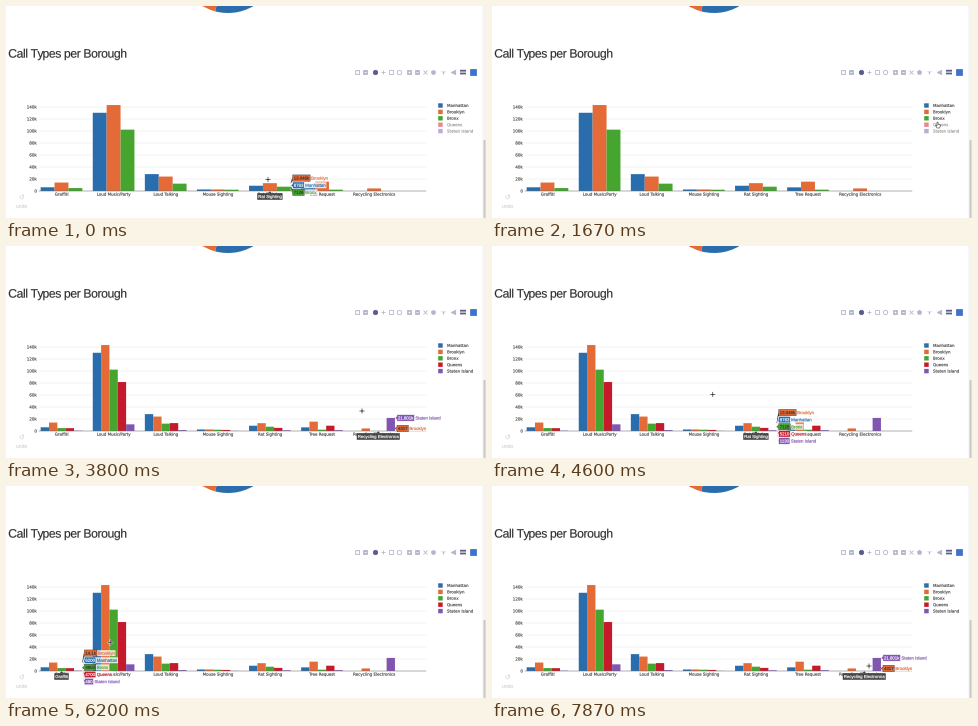
A matplotlib script that plays this animation: 480 by 212 pixels, repeating every 8 s.

```python
import matplotlib.pyplot as plt
import numpy as np
from matplotlib.animation import FuncAnimation
from matplotlib.patches import PathPatch, Polygon, Rectangle, Wedge
from matplotlib.path import Path
from matplotlib.textpath import TextPath

W, H, DPI = 480, 212, 100
FRAMES, STEP = 200, 40
PX = 72 / DPI

BLUE, ORANGE, GREEN, RED, PURPLE = COLORS = [
    "#2a6dac", "#e46a37", "#45a52e", "#c41a2b", "#8156b0"]
BOROUGHS = ["Manhattan", "Brooklyn", "Bronx", "Queens", "Staten Island"]
CALLS = {
    "Graffiti": [6200, 14100, 4900, 4700, 480],
    "Loud Music/Party": [130391, 143250, 102256, 81609, 11126],
    "Loud Talking": [28120, 24070, 12240, 13180, 1490],
    "Mouse Sighting": [2555, 2600, 2152, 1786, 200],
    "Rat Sighting": [8783, 13046, 7126, 5210, 1130],
    "Tree Request": [6080, 15560, 2210, 8840, 1370],
    "Recycling Electronics": [0, 4317, 0, 0, 21801],
}
NAMES = list(CALLS)
X0, PITCH, GROUP = 55.5, 52.1, 41.7
BASE, SCALE = 185, 0.0006
LEFT, RIGHT = 33, 420
SANS, WIDE = "Liberation Sans", "DejaVu Sans"
DARK = "#444444"

fig = plt.figure(figsize=(W / DPI, H / DPI), dpi=DPI, facecolor="white")
ax = fig.add_axes([0, 0, 1, 1])
ax.set(xlim=(0, W), ylim=(H, 0))
ax.axis("off")


def add(patch, z=1):
    patch.set(zorder=z, snap=False)
    return ax.add_patch(patch)


def rect(x, y, w, h, color, z=1, **kw):
    return add(Rectangle((x, y), w, h, fc=color, lw=0, **kw), z)


def poly(points, color, z=1, **kw):
    return add(Polygon(points, fc=color, **kw), z)


def line(xs, ys, color, width=1, z=1):
    return ax.plot(xs, ys, color=color, lw=width * PX, zorder=z, snap=False)[0]


def outline(s, size, font):
    path = TextPath((0, 0), s, size=100, prop={"family": font})
    return path.vertices * size / 100, path.codes


def width(s, size, font):
    return outline(s, size, font)[0][:, 0].max()


def text(x, y, s, size=4, color=DARK, font=WIDE, align=0, z=2, **kw):
    """Draw text with its capitals centred on y; align is 0, .5 or 1."""
    verts, codes = outline(s, size, font)
    shift = [x - align * verts[:, 0].max(), y + 0.36 * size]
    path = Path(verts * [1, -1] + shift, codes)
    return add(PathPatch(path, fc=color, ec=color, lw=0.1, **kw), z)


def center(cat):
    return X0 + PITCH * cat


def draw_page():
    for start, end, color in ((0, 105, BLUE), (105, 180, ORANGE)):
        add(Wedge((222, -43), 50, start, end, fc=color, lw=0))

    title, size, tracking = "Call Types per Borough", 12.2, -0.4
    for i, ch in enumerate(title):
        if ch != " ":
            x = width(title[:i] + "n", size, SANS) - width("n", size, SANS)
            text(2.2 + x + tracking * i, 47.2, ch, size, "#2c2c2c", SANS)

    rect(476.5, 0, 3.5, H, "#f4f4f4")
    rect(477.5, 134, 2, H - 134, "#c8c8c8")
    text(15.5, 191, "↺", 7, "#d8d8d8", WIDE, 0.5)
    text(15.5, 200, "undo", 5, "#d4d4d4", SANS, 0.5)


def draw_modebar():
    """Icons as marker stacks; a lower-case 'w' suffix means a white overlay."""
    pale, active, logo = "#b4b5ca", "#5a5d86", "#3f72cf"
    groups = [["s ow", "s _w"], ["o", "+", "s hollow", "o hollow"],
              ["s +w", "s _w", "x", "p"], ["1"], ["<"], ["="], ["s"]]
    x, y = 351, 66
    for g, group in enumerate(groups):
        for icon in group:
            base, *extra = icon.split()
            color = active if icon in ("o", "=") else pale
            color = logo if g == len(groups) - 1 else color
            size = 6 if color == logo else 4.4
            if base == "=":
                for dy in (-2.2, 0.6):
                    rect(x - 3, y + dy, 6, 1.8, color)
            else:
                face = "none" if extra == ["hollow"] else color
                ax.plot(x, y, base, ms=size * PX, mfc=face, mec=color,
                        mew=0.8 * PX)
            if extra and extra[0].endswith("w") and extra != ["hollow"]:
                ax.plot(x, y, extra[0][0], ms=2.6 * PX, mfc="white",
                        mec="white", mew=0.8 * PX)
            x += 8
        x += 2


def draw_axes():
    for i in range(8):
        y = BASE - 12 * i
        if i:
            line([LEFT, RIGHT], [y, y], "#f1f1f1", 0.8, 0.5)
        text(30.7, y, f"{20 * i}k" if i else "0", align=1)
    line([LEFT, RIGHT], [BASE, BASE], "#666666", 0.5, 3)
    for i, name in enumerate(NAMES):
        text(center(i), 188.2, name, align=0.5)


def bar_left(cat, k, n):
    return center(cat) + GROUP * (k / n - 0.5)


def draw_traces(n):
    """Bars and legend with the first n boroughs switched on."""
    parts = []
    for cat, values in enumerate(CALLS.values()):
        for k, v in enumerate(values[:n]):
            parts.append(rect(bar_left(cat, k, n), BASE - v * SCALE,
                              GROUP / n, v * SCALE, COLORS[k]))
    for k, name in enumerate(BOROUGHS):
        y, alpha = 99.5 + 6.4 * k, 1 if k < n else 0.5
        parts.append(rect(432.2, y - 2.2, 4.5, 4.4, COLORS[k], alpha=alpha))
        parts.append(text(441, y, name, alpha=alpha))
    return parts


def spread(ys, gap=7.1):
    """Push sorted positions apart to at least gap, keeping group means."""
    blocks = []
    for y in ys:
        blocks.append([y])
        while len(blocks) > 1:
            a, b = blocks[-2:]
            if np.mean(b) - np.mean(a) >= gap * (len(a) + len(b)) / 2:
                break
            blocks[-2:] = [a + b]
    return [np.mean(b) + gap * (i - (len(b) - 1) / 2)
            for b in blocks for i in range(len(b))]


def short(v):
    return f"{v / 1000:.3f}".rstrip("0") + "k" if v >= 10000 else str(v)


def tag(x, tip, y, right, half=3.2):
    """Label box with an arrow on its left side."""
    x1, top, low = x + 2, y - half, y + half
    return [(x, tip), (x1, y - half / 2), (x1, top), (right, top),
            (right, low), (x1, low), (x1, y + half / 2)]


def draw_tip(n, cat):
    parts, size = [], 4.33
    shown = sorted(((v, k) for k, v in enumerate(CALLS[NAMES[cat]][:n]) if v),
                   reverse=True)
    tops = [BASE - v * SCALE for v, _ in shown]
    x = center(cat) + GROUP / 2
    edge = dict(lw=0.4 * PX)
    for (v, k), top, y in zip(shown, tops, spread(tops)):
        ink = "#333333" if COLORS[k] in (ORANGE, GREEN) else "white"
        value, name = short(v), BOROUGHS[k]
        right = x + 4 + width(value, size, SANS)
        parts += [
            rect(right, y - 3, width(name, size, SANS) + 2, 6, "white", 5,
                 alpha=0.8),
            poly(tag(x, top, y, right), COLORS[k], 6, ec=ink, **edge),
            text(x + 3, y, value, size, ink, SANS, z=7),
            text(right + 1, y, name, size, COLORS[k], SANS, z=7),
        ]
    mid = np.mean([bar_left(cat, k + 0.5, n) for _, k in shown])
    w = width(NAMES[cat], size, SANS) + 2
    parts += [
        poly([(mid - 2, 187.3), (mid, 185.2), (mid + 2, 187.3)], DARK, 8, lw=0),
        rect(mid - w / 2, 187.2, w, 6.6, DARK, 8),
        text(mid, 190.5, NAMES[cat], size, "white", SANS, 0.5, z=9),
    ]
    return parts


# Pointer glides: start ms, end ms, x, y
HOME = (262, 173.5)
GLIDES = [
    (500, 730, 333, 171), (900, 1500, 446, 119), (1900, 2500, 449, 128),
    (2800, 3670, 356, 165), (4040, 4870, 176, 143), (5020, 5150, 101, 141),
    (5560, 5870, 57, 150), (6090, 6330, 165, 165), (6630, 6870, 214, 166),
    (7040, 7230, 318, 172), (7430, 7600, 377, 180)]
QUEENS_ON, STATEN_ON = 1920, 2920
HOVER_LAG = 70


def pointer(t):
    pos = np.array(HOME)
    for start, end, *goal in GLIDES:
        u = np.clip((t - start) / (end - start), 0, 1)
        pos = pos + u * u * (3 - 2 * u) * (goal - pos)
    return pos


def hovered(t):
    """Category nearest to the pointer a moment ago, if inside the plot."""
    x = pointer(t - HOVER_LAG)[0]
    if x > RIGHT:
        return None
    return int(np.clip(round((x - X0) / PITCH), 0, len(NAMES) - 1))


def state(t):
    return 3 + (t >= QUEENS_ON) + (t >= STATEN_ON), hovered(t)


draw_page()
draw_modebar()
draw_axes()
bars = {n: draw_traces(n) for n in (3, 4, 5)}
states = {state(i * STEP) for i in range(FRAMES)}
tips = {s: draw_tip(*s) for s in states if s[1] is not None}

cross = [line([], [], c, w, 12) for c, w in (("white", 1.4), ("#333333", 0.7))]
HAND = np.array([(-1, -2.8), (0, -2.8), (0.2, -0.6), (2.5, 0.2), (1.7, 3),
                 (-1, 3), (-2.4, 0.4), (-1, 0.6)])
hand = poly(HAND, "white", 12, ec="#444444", lw=0.6 * PX)


def show(groups, active):
    for key, parts in groups.items():
        for part in parts:
            part.set_visible(key == active)


def update(i):
    t = i * STEP
    now = state(t)
    show(bars, now[0])
    show(tips, now)
    x, y = pointer(t)
    on_legend = x > RIGHT
    hand.set_xy(HAND + [x, y])
    hand.set_visible(on_legend)
    for part in cross:
        part.set_data([x - 2.2, x + 2.2, np.nan, x, x],
                      [y, y, np.nan, y - 2.2, y + 2.2])
        part.set_visible(not on_legend)


anim = FuncAnimation(fig, update, frames=FRAMES, interval=STEP, repeat=True)
plt.show()
```
